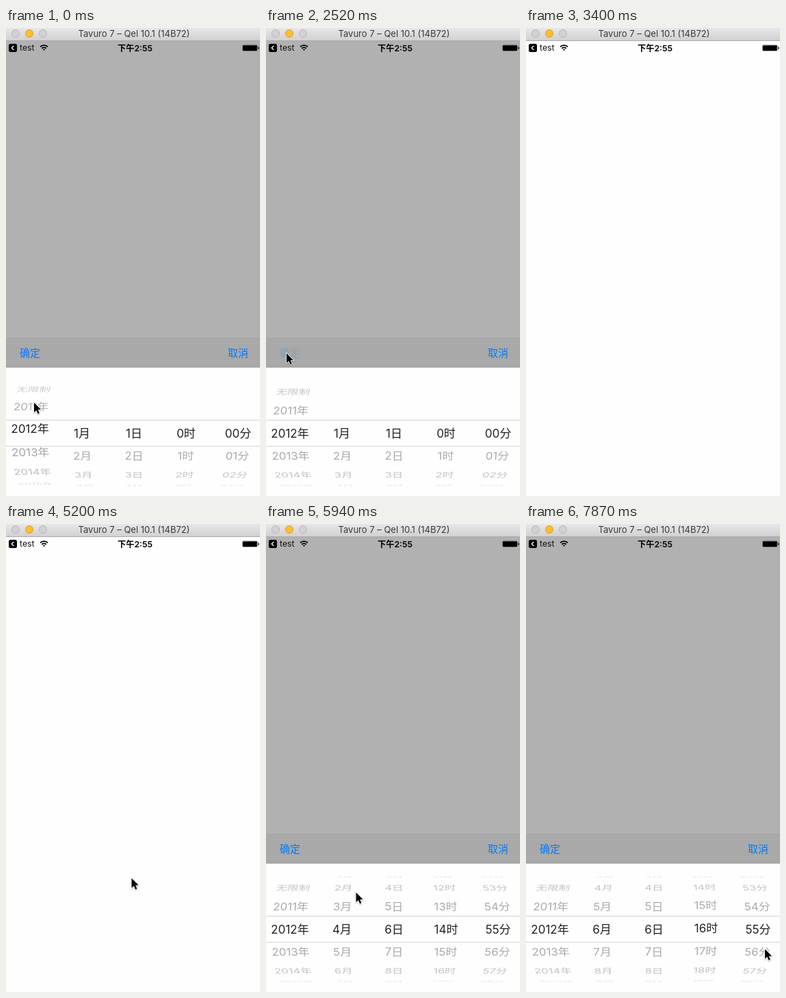
Recreate the animation shown at these times as an HTML page with a canvas. Size 371 px wide and 682 px high, loop 8 s.

```html
<!DOCTYPE html>
<html lang="zh-CN">
<head>
<meta charset="utf-8">
<style>
  html, body { margin: 0; width: 100%; height: 100%; overflow: hidden; background: #fefefe; }
  canvas { display: block; }
</style>
</head>
<body>
<canvas id="stage" width="371" height="682"></canvas>
<script>
const ctx = document.getElementById('stage').getContext('2d');
const FAMILY = 'Inter, "Noto Sans CJK SC", "Noto Sans CJK", sans-serif';
const RADIUS = 78, STEP = 0.443, DEPTH = 950, MID_X = 187, MID_Y = 590.5;
const BLUE = '#007aff', PAPER = '#fefefe';

// Time advances in ticks of 148 ms, with a long pause after tick 23.
const TICK = 148, PAUSE_TICK = 23, RESUME_MS = 5190;
const PRESS = 17, CLOSE = 19, REOPEN = 26;

// Places the pointer eases between: [tick, x, y].
const waypoints = [
  [0, 41, 546], [4, 76, 568], [9, 48.5, 598.5], [PRESS, 30, 474], [21, 30, 474], [22, 205, 604],
  [REOPEN, 162, 428.5], [31, 115, 596], [35, 127, 514], [39, 257, 588], [42, 349, 619.5]
];

const columns = [
  { first: 0, label: n => n ? 2010 + n + '年' : '无限制' },
  { first: 1, label: n => n + '月' },
  { first: 1, label: n => n + '日' },
  { first: 0, label: n => n + '时' },
  { first: 0, label: n => String(n).padStart(2, '0') + '分' }
];

function ease(tick, start, end) {
  const f = Math.min(1, Math.max(0, (tick - start) / (end - start)));
  return f * f * (3 - 2 * f);
}

function tickAt(ms) {
  return ms < RESUME_MS
    ? Math.min(PAUSE_TICK, Math.floor((ms + 8) / TICK))
    : PAUSE_TICK + 1 + Math.floor((ms - RESUME_MS) / TICK);
}

function wheelPositions(tick) {
  if (tick < REOPEN) {
    const year = 2.19 - 0.19 * ease(tick, 0, 2) - ease(tick, 5, 9.6) + ease(tick, 10, 14);
    return [year, 1, 1, 0, 0];
  }
  const month = 4 + 2.1 * ease(tick, 31, 35) - 0.1 * ease(tick, 35, 37);
  return [2, month, 6, 14 + 2.04 * ease(tick, 39, 42), 55];
}

function pointerAt(tick) {
  let [, x, y] = waypoints[0];
  for (let i = 1; i < waypoints.length; i++) {
    const [start, x0, y0] = waypoints[i - 1], [end, x1, y1] = waypoints[i];
    const f = ease(tick, start, end);
    x += (x1 - x0) * f;
    y += (y1 - y0) * f;
  }
  return [x, y];
}

function rect(x, y, w, h, color, radius = 0) {
  ctx.beginPath();
  ctx.roundRect(x, y, w, h, radius);
  ctx.fillStyle = color;
  ctx.fill();
}

function text(str, x, y, size, color, align = 'left', weight = 400) {
  ctx.font = `${weight} ${size}px ${FAMILY}`;
  ctx.textAlign = align;
  ctx.fillStyle = color;
  ctx.fillText(str, x, y);
}

function stroke(color, width) {
  ctx.strokeStyle = color;
  ctx.lineWidth = width;
  ctx.stroke();
}

function disc(x, y, fill, edge) {
  ctx.beginPath();
  ctx.arc(x, y, 5.5, 0, 7);
  ctx.fillStyle = fill;
  ctx.fill();
  stroke(edge, 1);
}

function drawTitleBar() {
  const shade = ctx.createLinearGradient(0, 0, 0, 18);
  shade.addColorStop(0, '#e8e6e8');
  shade.addColorStop(1, '#d2d0d2');
  rect(0, 0, 371, 18, shade);
  rect(0, 18, 371, 1, '#acaaac');
  for (const x of [14, 54]) disc(x, 8, '#d3d1d3', '#b8b6b8');
  disc(34, 8, '#fdbe2f', '#e0a023');
  text('Tavuro 7 – Qel 10.1 (14B72)', MID_X, 13, 13, '#3a393a', 'center');
}

function drawStatusBar() {
  rect(4, 23, 12, 12, '#000', 2.5);
  ctx.beginPath();
  ctx.moveTo(11.3, 26);
  ctx.lineTo(8.2, 29);
  ctx.lineTo(11.3, 32);
  stroke('#fff', 1.3);
  text('test', 20, 33, 12.3, '#111');
  for (const r of [1.4, 4.6, 7.8]) {
    ctx.beginPath();
    ctx.arc(55.5, 33, r, -Math.PI * 0.75, -Math.PI * 0.25);
    stroke('#000', 1.8);
  }
  text('下午2:55', 188.5, 33.5, 12.2, '#000', 'center', 600);
  rect(345, 24.6, 22.6, 9.2, 'rgba(0,0,0,.45)', 2);
  rect(346, 25.4, 20.6, 7.6, '#000', 1);
  rect(368.2, 27.3, 1.5, 3.8, 'rgba(0,0,0,.8)', 0.7);
}

// Each row is foreshortened and sheared as if printed on a turning cylinder.
function drawWheel(column, position, x0, colorAt) {
  for (let n = Math.max(column.first, Math.ceil(position - 4)); n <= position + 4; n++) {
    const angle = (n - position) * STEP, sin = Math.sin(angle), cos = Math.cos(angle);
    if (Math.abs(angle) > 1.48) continue;
    const scale = 1 / (1 + RADIUS * (1 - cos) / DEPTH);
    const offset = x0 - MID_X;
    ctx.save();
    ctx.transform(scale, 0, -offset * sin / DEPTH, scale * cos,
      MID_X + offset * scale, MID_Y + RADIUS * sin);
    text(column.label(n), 0, 6.2, 17, colorAt(cos), 'center');
    ctx.restore();
  }
}

function drawWheels(positions, bands, colorAt) {
  ctx.save();
  ctx.beginPath();
  for (const [top, bottom] of bands) ctx.rect(0, top, 371, bottom - top);
  ctx.clip();
  columns.forEach((c, i) => drawWheel(c, positions[i], MID_X + 76 * (i - 2), colorAt));
  ctx.restore();
}

function drawPanel(positions, slide, pressed) {
  rect(0, 18, 371, 664, '#b1b1b1');
  ctx.save();
  ctx.translate(0, slide);
  rect(0, 451, 371, 44, '#a9a9a9');
  text('确定', 20, 478.5, 15, pressed ? '#869fb9' : BLUE);
  text('取消', 324, 478.5, 15, BLUE);
  rect(0, 495, 371, 187, PAPER);
  drawWheels(positions, [[511, 571], [610, 670]], cos => `rgba(0,0,0,${0.37 * cos})`);
  drawWheels(positions, [[571, 610]], () => '#222');
  for (const y of [571, 609]) rect(0, y, 371, 1, '#d4d4d4');
  ctx.restore();
}

function drawPointer(x, y) {
  ctx.save();
  ctx.translate(x, y);
  const arrow = new Path2D('M0 0V14L3.3 11.2L5.6 16.3L7.9 15.3L5.7 10.3L10 10Z');
  ctx.shadowColor = 'rgba(0,0,0,.3)';
  ctx.shadowBlur = 2;
  ctx.shadowOffsetY = 1;
  ctx.strokeStyle = '#fff';
  ctx.lineWidth = 1.6;
  ctx.stroke(arrow);
  ctx.shadowColor = 'transparent';
  ctx.fillStyle = '#000';
  ctx.fill(arrow);
  ctx.restore();
}

function draw() {
  const tick = tickAt(performance.now() % 8000);
  rect(0, 0, 371, 682, PAPER);
  if (tick < CLOSE || tick >= REOPEN) {
    const pressed = tick >= PRESS && tick < CLOSE;
    drawPanel(wheelPositions(tick), tick === REOPEN ? 16.5 : 0, pressed);
  }
  drawTitleBar();
  drawStatusBar();
  if (tick !== PAUSE_TICK) drawPointer(...pointerAt(tick));
  requestAnimationFrame(draw);
}
draw();
</script>
</body>
</html>
```
